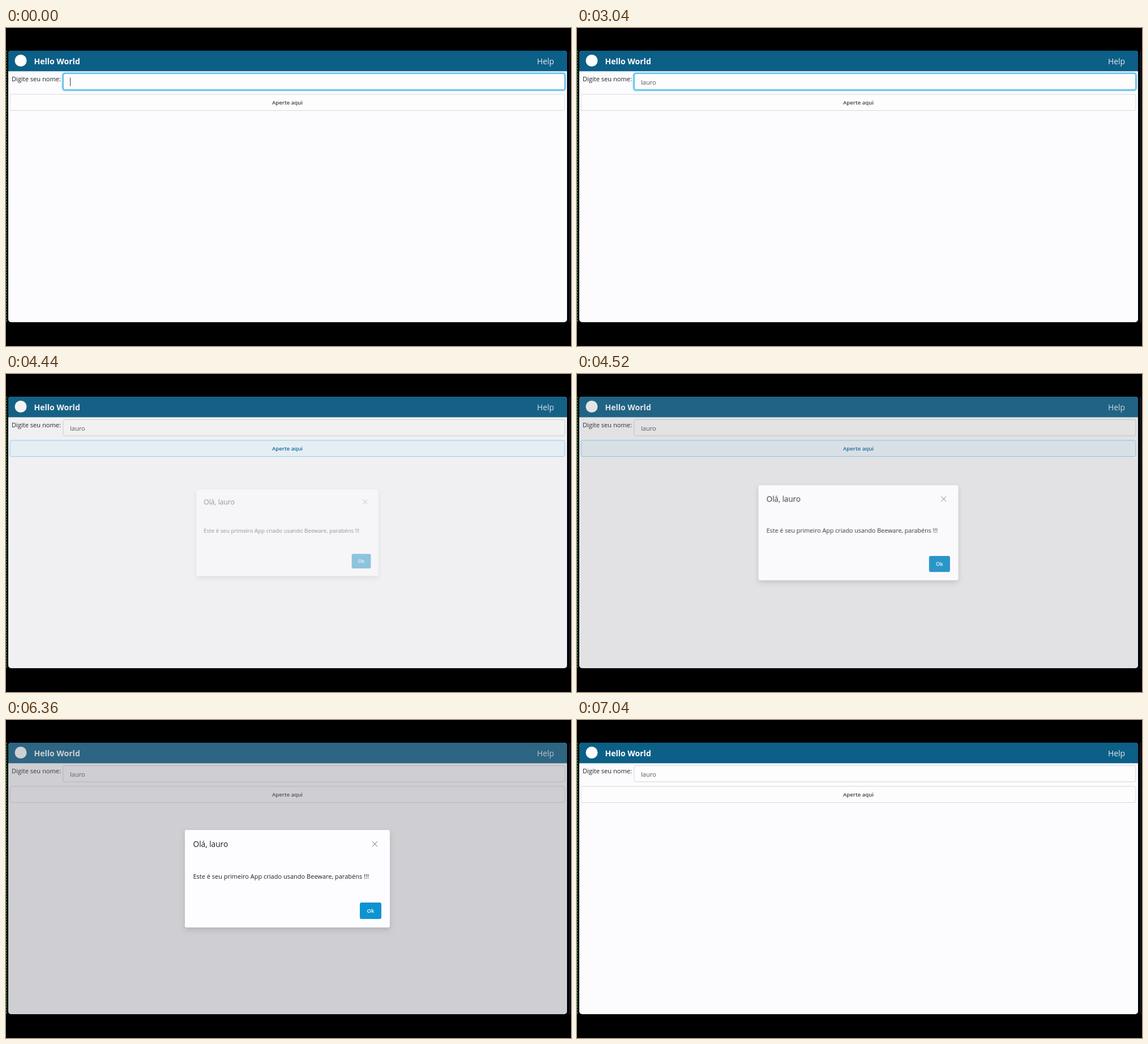
Write an HTML page that moves like this. It is 998x561 px and loops after 7.88 s.

```html
<!DOCTYPE html>
<html lang="pt">
<head>
<meta charset="utf-8">
<title>Hello World</title>
<style>
  html, body { margin: 0; width: 100%; height: 100%; overflow: hidden; background: #000; }
  svg { display: block; width: 100vw; height: 100vh; }
  text { font: 11.1px "Open Sans", "Noto Sans", sans-serif; fill: #1f1f24; }
  .brand { font-size: 14px; font-weight: 700; fill: #fff; }
  .help { font-size: 13.9px; fill: #e4edf3; }
  .value { fill: #56565e; }
  .label { font-size: 9.6px; font-weight: 600; text-anchor: middle; }
  .title { font-size: 13.7px; }
  .message { font-size: 11px; }

  .type, .caret, .focus, .button, .button text, .shade, .dialog, .ok {
    animation: 7880ms linear infinite;
  }
  .type { animation-name: type; animation-timing-function: step-end; }
  .caret { animation-name: blink; animation-timing-function: step-end; }
  .focus { animation-name: focus; }
  .button { animation-name: press; }
  .button text { animation-name: press-text; }
  .shade { animation-name: shade; }
  .dialog { animation-name: dialog; transform-origin: 497px 280px; }
  .ok { animation-name: ok; }

  /* the caret carries a cover that hides the letters not yet typed */
  @keyframes type {
    0% { transform: translateX(0); }
    17.16% { transform: translateX(2.8px); }
    25.28% { transform: translateX(9px); }
    27.82% { transform: translateX(15.8px); }
    28.83% { transform: translateX(20.3px); }
    31.88%, 100% { transform: translateX(27.2px); }
  }
  @keyframes blink {
    0% { opacity: 1; }
    4.98% { opacity: 0; }
    11.07% { opacity: 1; }
    37.97% { opacity: 0; }
    46.09% { opacity: 1; }
    48.63%, 100% { opacity: 0; }
  }
  @keyframes focus {
    0%, 48.63% { opacity: 1; }
    50.25%, 100% { opacity: 0; }
  }
  @keyframes press {
    0%, 46.09% { fill: #fdfdfe; stroke: #d9d9dd; }
    46.7%, 48.63% { fill: #f0f9ff; stroke: #8fd8f8; }
    49.24%, 52.16% { fill: #e0f2fe; stroke: #38bdf8; }
    52.7%, 57.87% { fill: #f0f9ff; stroke: #8fd8f8; }
    58.69%, 100% { fill: #fdfdfe; stroke: #d9d9dd; }
  }
  @keyframes press-text {
    0%, 46.09% { fill: #3f3f46; }
    46.7%, 57.87% { fill: #0369a1; }
    58.69%, 100% { fill: #3f3f46; }
  }
  @keyframes shade {
    0%, 55.52% { opacity: 0; }
    58.69%, 85.91% { opacity: 1; }
    89.09%, 100% { opacity: 0; }
  }
  @keyframes dialog {
    0% { opacity: 0; transform: scale(.8); }
    55.52% { opacity: 0; transform: scale(.8); animation-timing-function: ease; }
    58.69% { opacity: 1; transform: scale(1); }
    85.91% { opacity: 1; transform: scale(1); animation-timing-function: ease; }
    89.09%, 100% { opacity: 0; transform: scale(.8); }
  }
  @keyframes ok {
    0%, 68.02% { fill: #0e89c5; }
    68.78%, 76.04% { fill: #0ea5e9; }
    76.65%, 80.46% { fill: #0e89c5; }
    81.22%, 100% { fill: #0ea5e9; }
  }
</style>
</head>
<body>
<svg viewBox="0 0 998 561">
  <defs>
    <clipPath id="window"><rect x="4" y="40" width="987" height="479" rx="5"/></clipPath>
    <filter id="soft" x="-10%" y="-20%" width="120%" height="140%"><feGaussianBlur stdDeviation="5"/></filter>
  </defs>
  <rect width="998" height="561"/>
  <path d="M1 40V520" stroke="#1f8040" stroke-width="1.5" stroke-dasharray="3 2"/>
  <path d="M995.5 40V520" stroke="#0d1122" stroke-width="3"/>

  <g clip-path="url(#window)">
    <rect x="4" y="40" width="987" height="479" fill="#fcfcfe"/>
    <rect x="4" y="40" width="987" height="36.3" fill="#0c5f87"/>
    <circle cx="26" cy="57.5" r="10.5" fill="#fff"/>
    <text class="brand" x="49.5" y="64">Hello World</text>
    <text class="help" x="938" y="64">Help</text>

    <text x="10" y="94">Digite seu nome:</text>
    <rect x="101" y="80.5" width="886" height="28.5" rx="3" fill="#fdfdfe" stroke="#d4d4d8"/>
    <g class="focus" fill="none">
      <rect x="100" y="79.5" width="888" height="30.5" rx="4" stroke="#0ea5e9" stroke-opacity=".45" stroke-width="3"/>
      <rect x="101" y="80.5" width="886" height="28.5" rx="3" stroke="#2fb1ea"/>
    </g>
    <text class="value" x="113" y="100">lauro</text>
    <g class="type">
      <rect x="113" y="86" width="32" height="18" fill="#fdfdfe"/>
      <rect class="caret" x="113" y="87.5" width="1" height="15" fill="#3f3f46"/>
    </g>

    <g class="button">
      <rect x="7" y="117" width="980" height="28.5" rx="3"/>
      <text class="label" x="497" y="135" stroke="none">Aperte aqui</text>
    </g>

    <rect class="shade" x="4" y="40" width="987" height="479" fill="#71717a" fill-opacity=".33"/>
    <g class="dialog">
      <rect x="316" y="198" width="362" height="172" rx="3" fill="#71717a" fill-opacity=".3" filter="url(#soft)"/>
      <rect x="316" y="194" width="362" height="172" rx="3" fill="#fdfdff"/>
      <text class="title" x="330.5" y="224">Olá, lauro</text>
      <path d="M647.3 214.5l8.4 8.4m0-8.4l-8.4 8.4" stroke="#62626b" stroke-linecap="round"/>
      <text class="message" x="330.5" y="280">Este é seu primeiro App criado usando Beeware, parabéns !!!</text>
      <rect class="ok" x="625" y="322" width="38" height="29" rx="3"/>
      <text class="label" x="644" y="340" style="fill:#fff">Ok</text>
    </g>
  </g>
</svg>
</body>
</html>
```
